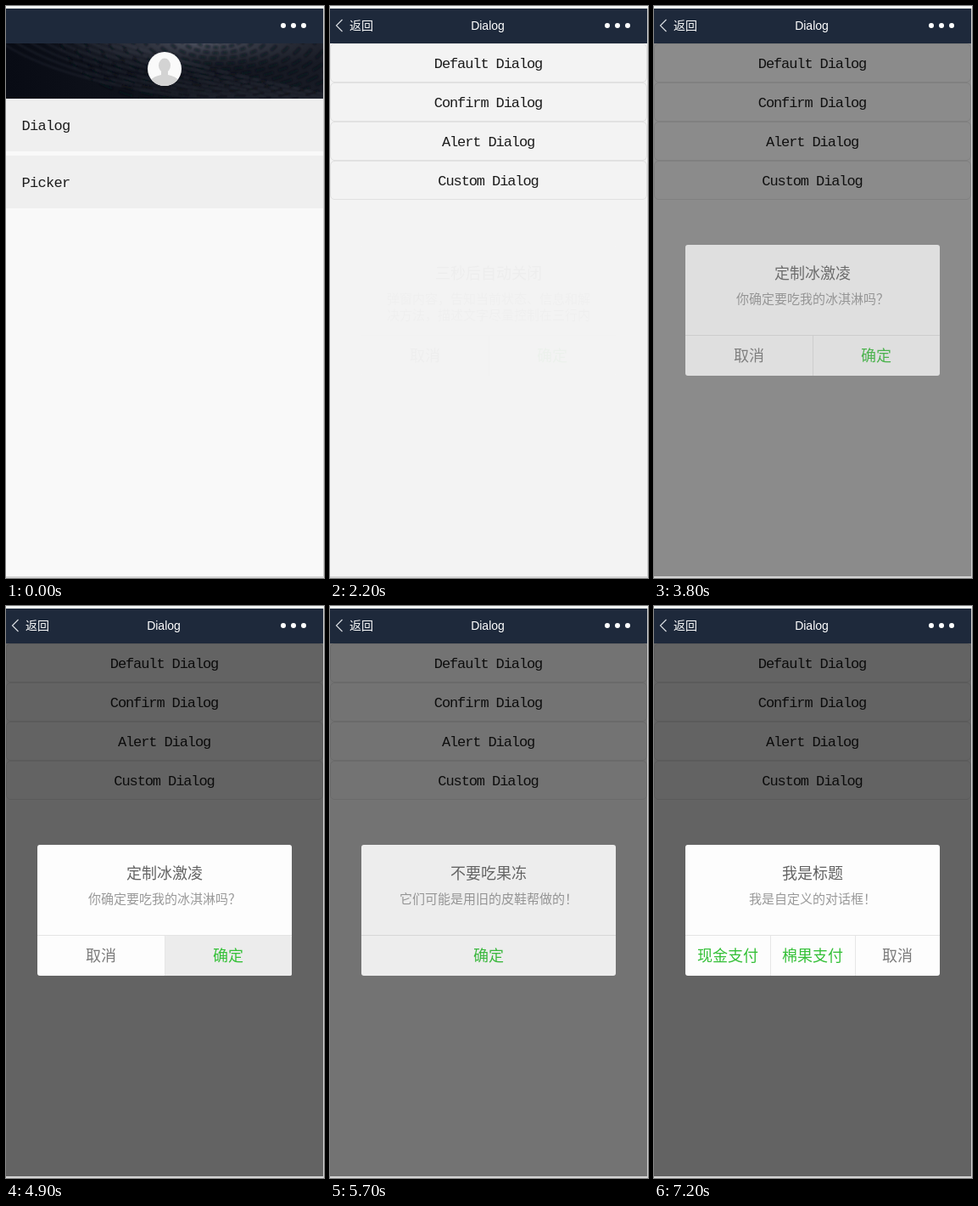
These frames come from a looping animation (375x673 px, 8 s). An HTML page:

```html
<!DOCTYPE html>
<html lang="zh">
<head>
<meta charset="utf-8">
<title>Dialog</title>
<style>
  html, body { margin: 0; width: 100%; height: 100%; overflow: hidden; background: #f9f9f9; }
  svg { display: block; width: 375px; height: 673px; }
  .mono { font: 17px "Liberation Mono", monospace; letter-spacing: -1.1px; fill: #1c1c1c; }
  .wide { letter-spacing: -.7px; }
  .bar { font: 500 14px "Liberation Sans", "Noto Sans CJK SC", "Noto Sans CJK", sans-serif; fill: #fff; }
  .cjk { font-family: "Noto Sans CJK SC", "Noto Sans CJK", sans-serif; font-weight: 300; text-anchor: middle; }
  .mid { text-anchor: middle; }
</style>
</head>
<body>
<svg id="stage" viewBox="0 0 375 673">
  <defs>
    <linearGradient id="night">
      <stop offset="0" stop-color="#080b14"/>
      <stop offset=".35" stop-color="#0e111a"/>
      <stop offset="1" stop-color="#181b25"/>
    </linearGradient>
    <radialGradient id="glow" cx=".62" cy="0" r=".5">
      <stop offset="0" stop-color="#5c6170" stop-opacity=".8"/>
      <stop offset="1" stop-color="#30343f" stop-opacity="0"/>
    </radialGradient>
    <filter id="soft"><feGaussianBlur stdDeviation=".8"/></filter>
    <clipPath id="bannerClip"><rect y="44" width="374" height="65"/></clipPath>
    <clipPath id="avatarClip"><circle cx="187" cy="74" r="20"/></clipPath>
  </defs>

  <rect width="375" height="673" fill="#f9f9f9"/>
  <rect y="3" width="374" height="41" fill="#1e293b"/>
  <g fill="#fff"><circle cx="327" cy="23" r="3"/><circle cx="339" cy="23" r="3"/><circle cx="351" cy="23" r="3"/></g>

  <g id="home">
    <g clip-path="url(#bannerClip)">
      <rect y="44" width="374" height="65" fill="url(#night)"/>
      <rect y="44" width="374" height="65" fill="url(#glow)"/>
      <g id="swirl" fill="none" filter="url(#soft)"></g>
    </g>
    <circle cx="187" cy="74" r="20" fill="#fafafa"/>
    <g clip-path="url(#avatarClip)" fill="#d3d3d3">
      <ellipse cx="187" cy="70" rx="7" ry="8.5"/>
      <path d="M183 76h8v5q10 2 13 7v8h-34v-8q3-5 13-7z"/>
    </g>
    <rect y="109" width="374" height="62" fill="#efefef"/>
    <rect y="176" width="374" height="62" fill="#efefef"/>
    <text class="mono wide" x="18.5" y="146">Dialog</text>
    <text class="mono wide" x="18.5" y="213">Picker</text>
  </g>

  <g id="page">
    <rect y="44" width="374" height="627" fill="#fffff8"/>
    <path d="M14.5 16L7.5 23L14.5 30" fill="none" stroke="#d5d8dd" stroke-width="1.2"/>
    <text class="bar" x="23" y="28.3">返回</text>
    <text class="bar mid" x="186" y="28">Dialog</text>
  </g>
  <rect id="progress" y="43.5" height="2.5" fill="#3fae3f"/>

  <g id="list"><rect y="44" width="374" height="627" fill="#f8f8f8"/></g>
  <g id="dialogs"></g>

  <rect width="375" height="3" fill="#f4f9f7"/>
  <rect x="374" y="3" width="1" height="668" fill="#d0d0d0"/>
  <rect y="671" width="375" height="2" fill="#d6d6d6"/>
</svg>
<script>
const $ = id => document.getElementById(id);
const GREEN = '#35c038', GREY = '#7c7c7c';

function add(parent, tag, attrs, content) {
  const el = document.createElementNS('http://www.w3.org/2000/svg', tag);
  for (const key in attrs) el.setAttribute(key, attrs[key]);
  if (content) el.textContent = content;
  return parent.appendChild(el);
}

const label = (parent, content, x, y, size, fill) =>
  add(parent, 'text', { class: 'cjk', x, y: y + size * .37, 'font-size': size, fill }, content);

// Banner: long light streaks under broken dark rings
for (let i = 0; i < 9; i++) {
  add($('swirl'), 'path', {
    d: `M${i * 17 - 10} 40Q${70 + i * 18} ${96 - i * 3} ${270 + i * 18} 112`,
    stroke: '#6b7180', 'stroke-width': 2, opacity: .16
  });
}
for (let i = 0; i < 13; i++) {
  const rx = 18 + i * 14;
  add($('swirl'), 'ellipse', {
    cx: 250, cy: 34, rx, ry: rx * .46, stroke: '#0b0e15',
    'stroke-width': 3.5, 'stroke-dasharray': `${5 + i} ${3 + i * .4}`, opacity: .55
  });
}

['Default', 'Confirm', 'Alert', 'Custom'].forEach((name, i) => {
  const y = 44 + i * 46;
  add($('list'), 'rect', { x: .5, y: y + .5, width: 373, height: 45, rx: 5, fill: 'none', stroke: '#000', 'stroke-opacity': .08 });
  add($('list'), 'text', { class: 'mono mid', x: 186.5, y: y + 29 }, name + ' Dialog');
});

function makeDialog(title, lines, buttons, pressed) {
  const mask = add($('dialogs'), 'rect', { y: 44, width: 374, height: 627, 'fill-opacity': .6 });
  const box = add($('dialogs'), 'g', {});
  add(box, 'rect', { x: 37, y: 281, width: 300, height: 154, rx: 3, fill: '#fdfdfd' });
  label(box, title, 187, 314, 18, '#636363');
  lines.forEach((line, i) => label(box, line, 187, 344 + i * 19, 15, '#999'));
  const width = 300 / buttons.length;
  let press;
  buttons.forEach(([text, fill], i) => {
    const x = 37 + i * width;
    if (i === pressed) press = add(box, 'rect', { x, y: 388, width, height: 47, rx: 2, fill: '#ececec' });
    if (i) add(box, 'rect', { x, y: 388, width: 1, height: 47, fill: '#e6e6e6' });
    label(box, text, x + width / 2, 411, 18, fill);
  });
  add(box, 'rect', { x: 37, y: 387, width: 300, height: 1, fill: '#e4e4e4' });
  return { mask, box, press };
}

const cancel = ['取消', GREY], ok = ['确定', GREEN];
const slowIn = [.03, .42, .89, .99, 1], quickIn = [.12, .74, .96, 1];
const out = [.97, .4, .06, 0], lateOut = [1, .65, .14, 0];

// Each ramp is [start ms, values held for 100 ms each]
const dialogs = [
  { ...makeDialog('三秒后自动关闭', ['弹窗内容，告知当前状态、信息和解', '决方法，描述文字尽量控制在三行内'], [cancel, ok], 1),
    ramps: [[2200, slowIn], [3100, out]] },
  { ...makeDialog('定制冰激凌', ['你确定要吃我的冰淇淋吗？'], [cancel, ok], 1),
    ramps: [[3700, quickIn], [4900, lateOut]] },
  { ...makeDialog('不要吃果冻', ['它们可能是用旧的皮鞋帮做的！'], [ok], 0),
    ramps: [[5500, slowIn], [6300, lateOut]] },
  { ...makeDialog('我是标题', ['我是自定义的对话框！'], [['现金支付', GREEN], ['棉果支付', GREEN], cancel]),
    ramps: [[6900, quickIn]] }
];
const pageRamp = [[600, [.3, .75, 1]]];
const progressRamp = [[900, [20, 81, 180, 260, 300]], [1700, [375, 375, 0]]];
const listRamp = [[1700, [.4, .85, 1]]];

function valueAt(ramps, t) {
  let value = 0;
  for (const [start, steps] of ramps) {
    if (t >= start) value = steps[Math.min(steps.length - 1, Math.floor((t - start) / 100))];
  }
  return value;
}

function fade(el, opacity) {
  el.style.display = opacity ? '' : 'none';
  el.style.opacity = opacity;
}

function draw(t) {
  fade($('page'), valueAt(pageRamp, t));
  fade($('list'), valueAt(listRamp, t));
  $('progress').setAttribute('width', valueAt(progressRamp, t));
  for (const { mask, box, press, ramps } of dialogs) {
    const opacity = valueAt(ramps, t);
    fade(mask, opacity);
    fade(box, opacity);
    if (press) fade(press, t >= ramps[1][0] ? 1 : 0);
  }
}

const begin = performance.now();
function tick() {
  draw((performance.now() - begin) % 8000);
  requestAnimationFrame(tick);
}
tick();
</script>
</body>
</html>
```
